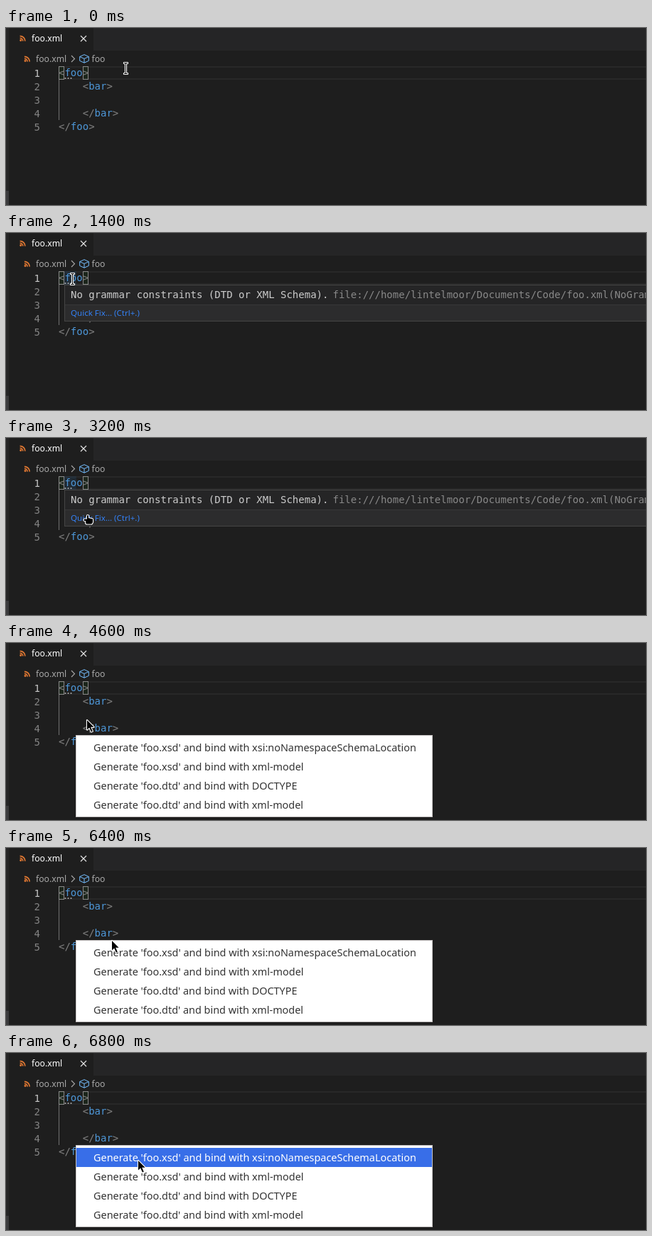
Animation, 900 px wide and 250 px high, one loop 8 s. Source, as an HTML page with a canvas:

```html
<!DOCTYPE html>
<html lang="en">
<head>
<meta charset="utf-8">
<title>Generate a grammar from a quick fix</title>
<style>
  html, body { margin: 0; width: 100%; height: 100%; overflow: hidden; background: #1e1e1e; }
  canvas { display: block; width: 900px; height: 250px; }
</style>
</head>
<body>
<canvas id="stage" width="900" height="250"></canvas>
<script>
const ctx = document.getElementById('stage').getContext('2d');
const LOOP = 8000, TICK = 100, HOVER_AT = 1300, MENU_AT = 4600;
const MONO = '14px "DejaVu Sans Mono", monospace';
const CHAR = 8.43, LINE = 19, CODE = { x: 74, y: 54 };
const HOVER = { x: 82, y: 73, w: 820, h: 52, split: 28 };
const MENU = { x: 98, y: 130, w: 502, h: 116, pad: 4, row: 27 };
const ui = size => `${size}px "Noto Sans", sans-serif`;

const codeLines = ['<foo>', '    <bar>', '', '    </bar>', '</foo>'];

const menuItems = [
  ['xsd', 'xsi:noNamespaceSchemaLocation'],
  ['xsd', 'xml-model'],
  ['dtd', 'DOCTYPE'],
  ['dtd', 'xml-model']
].map(([type, binding]) => `Generate 'foo.${type}' and bind with ${binding}`);

// The pointer rests between these straight moves
const home = { x: 168.5, y: 57 };
const moves = [
  { from: 500, to: 1000, x: 93.5, y: 65 },
  { from: 2400, to: 3200, x: 113, y: 107 },
  { from: 5400, to: 5800, x: 117, y: 120 },
  { from: 6000, to: 6400, x: 148, y: 129 },
  { from: 6400, to: 6800, x: 185, y: 150 }
];

function pointerAt(t) {
  let { x, y } = home;
  for (const move of moves) {
    const k = Math.min(1, Math.max(0, (t - move.from) / (move.to - move.from)));
    x += (move.x - x) * k;
    y += (move.y - y) * k;
  }
  return { x, y };
}

function rect(x, y, w, h, color) {
  ctx.fillStyle = color;
  ctx.fillRect(x, y, w, h);
}

function frame(x, y, w, h, color) {
  ctx.strokeStyle = color;
  ctx.lineWidth = 1;
  ctx.strokeRect(x + .5, y + .5, w - 1, h - 1);
}

function text(str, x, y, font, color, align = 'left') {
  ctx.font = font;
  ctx.fillStyle = color;
  ctx.textAlign = align;
  ctx.fillText(str, x, y);
}

function dot(x, y, r, color) {
  ctx.fillStyle = color;
  ctx.beginPath();
  ctx.arc(x, y, r, 0, 2 * Math.PI);
  ctx.fill();
}

function line(points, color, width = 1.1) {
  ctx.beginPath();
  points.forEach(([x, y]) => ctx.lineTo(x, y));
  ctx.strokeStyle = color;
  ctx.lineWidth = width;
  ctx.stroke();
}

function fileIcon(x, y) {
  const color = '#e37933';
  dot(x + 1.5, y - 1.5, 1.4, color);
  ctx.strokeStyle = color;
  ctx.lineWidth = 1.7;
  for (const r of [4.2, 7.3]) {
    ctx.beginPath();
    ctx.arc(x + .4, y - .4, r, -Math.PI / 2, 0);
    ctx.stroke();
  }
}

function boxIcon(x, y) {
  const corner = i => {
    const a = (i - .5) * Math.PI / 3;
    return [x + 7.3 * Math.cos(a), y + 5.8 * Math.sin(a)];
  };
  line([0, 1, 2, 3, 4, 5, 6].map(corner), '#75beff', 1);
  for (const i of [0, 2, 4]) line([[x, y], corner(i)], '#75beff', 1);
}

function drawHeader() {
  rect(0, 0, 900, 250, '#1e1e1e');
  rect(123, 0, 777, 32, '#252526');
  rect(0, 0, 4, 250, '#252526');
  rect(0, 230, 4, 20, '#3a3a3c');

  fileIcon(19.2, 19);
  text('foo.xml', 36, 19, ui(12.2), '#ffffff');
  for (const s of [-1, 1]) line([[109 - 4 * s, 11], [109 + 4 * s, 19]], '#e8e8e8');

  fileIcon(25.5, 48);
  text('foo.xml', 42, 48, ui(12.2), '#a9a9a9');
  line([[92, 39], [96.5, 43.5], [92, 48]], '#a9a9a9');
  boxIcon(110, 43.4);
  text('foo', 120.5, 48, ui(12.2), '#a9a9a9');
}

function drawEditor(hover) {
  for (const dy of [0, LINE - 2]) rect(CODE.x, CODE.y + dy, 826, 2, '#282828');
  rect(82, CODE.y, 2 * CHAR, LINE, `rgba(38,79,120,${.25 * hover})`);
  rect(CODE.x, CODE.y + LINE, 1, 3 * LINE, '#707070');

  for (const column of [0, 4]) {
    const x = Math.round(CODE.x + column * CHAR);
    rect(x, CODE.y, 8, LINE, 'rgba(0,100,0,.1)');
    frame(x, CODE.y, 8, LINE, '#888888');
  }

  codeLines.forEach((source, i) => {
    const y = CODE.y + 14 + i * LINE;
    text(i + 1, 48, y + 1, MONO, i ? '#858585' : '#c6c6c6', 'right');
    for (const { 0: token, index } of source.matchAll(/\w+|[<>\/]+/g)) {
      text(token, CODE.x + index * CHAR, y, MONO, /\w/.test(token) ? '#4d97d8' : '#808080');
    }
  });
  for (let i = 0; i < 3; i++) dot(83.5 + i * 4, 71, 1, 'rgba(238,238,238,.7)');
}

function drawHover(alpha) {
  const { x, y, w, h, split } = HOVER;
  ctx.globalAlpha = alpha;
  rect(x, y, w, h, '#252526');
  rect(x, y + split, w, h - split, '#2c2c2d');
  rect(x, y + split, w, 1, '#383838');
  frame(x, y, w, h, '#454545');

  const message = 'No grammar constraints (DTD or XML Schema).';
  text(message, x + 9, y + 19, MONO, '#cccccc');
  text('file:///home/lintelmoor/Documents/Code/foo.xml(NoGrammarConstraints)',
    x + 15 + message.length * CHAR, y + 19, MONO, '#898989');
  text('Quick Fix… (Ctrl+.)', x + 9, y + 44, ui(11.55), '#3480f4');
  ctx.globalAlpha = 1;
}

function drawMenu(pointerY) {
  const { x, y, w, h, pad, row } = MENU;
  rect(x, y, w, h, '#ffffff');
  frame(x, y, w, h, '#c4c0c0');
  menuItems.forEach((label, i) => {
    const top = y + pad + i * row;
    const active = pointerY >= top && pointerY < top + row;
    if (active) rect(x + 1, top, w - 2, row, '#386ee8');
    text(label, x + 25, top + 19, ui(14.43), active ? '#ffffff' : '#333333');
  });
}

// Pointers are black shapes over the same shapes grown by a white rim
function rimmed(shape) {
  ctx.lineJoin = 'round';
  ctx.strokeStyle = '#ffffff';
  ctx.lineWidth = 2.2;
  ctx.stroke(shape);
  ctx.fillStyle = '#000000';
  ctx.fill(shape);
  ctx.lineJoin = 'miter';
}

function drawBeam() {
  const beam = new Path2D();
  beam.rect(-.5, -7.5, 1, 15);
  for (const s of [-1, 1]) beam.rect(-2.5, s * 7.5 - .5, 5, 1);
  rimmed(beam);
}

function drawArrow() {
  const arrow = new Path2D('M1 2 V15.5 L4.2 12.6 L6.8 18.6 L8.8 17.8 L6.2 11.8 H10.6 Z');
  rimmed(arrow);
}

function drawHand() {
  const hand = new Path2D();
  hand.roundRect(1, 2, 2, 12, 1);
  for (let i = 1; i < 4; i++) hand.roundRect(1 + 2 * i, 5.5 + i * .5, 2, 6, 1);
  hand.roundRect(-3.5, 7.5, 5, 2.5, 1);
  hand.roundRect(-1, 8.5, 9.5, 6, 2);
  rimmed(hand);
}

function render(now) {
  const t = Math.floor(now % LOOP / TICK) * TICK;
  const menuOpen = t >= MENU_AT;
  const hover = menuOpen ? 0 : Math.min(1, Math.max(0, (t + TICK - HOVER_AT) / (2 * TICK)));
  const { x, y } = pointerAt(t);

  drawHeader();
  drawEditor(hover);
  if (hover) drawHover(hover);
  if (menuOpen) drawMenu(y);

  ctx.save();
  ctx.translate(x, y);
  if (y < HOVER.y) drawBeam();
  else if (!menuOpen && y > HOVER.y + HOVER.split) drawHand();
  else drawArrow();
  ctx.restore();
}

const start = performance.now();
function loop() {
  render(performance.now() - start);
  requestAnimationFrame(loop);
}
loop();
</script>
</body>
</html>
```
